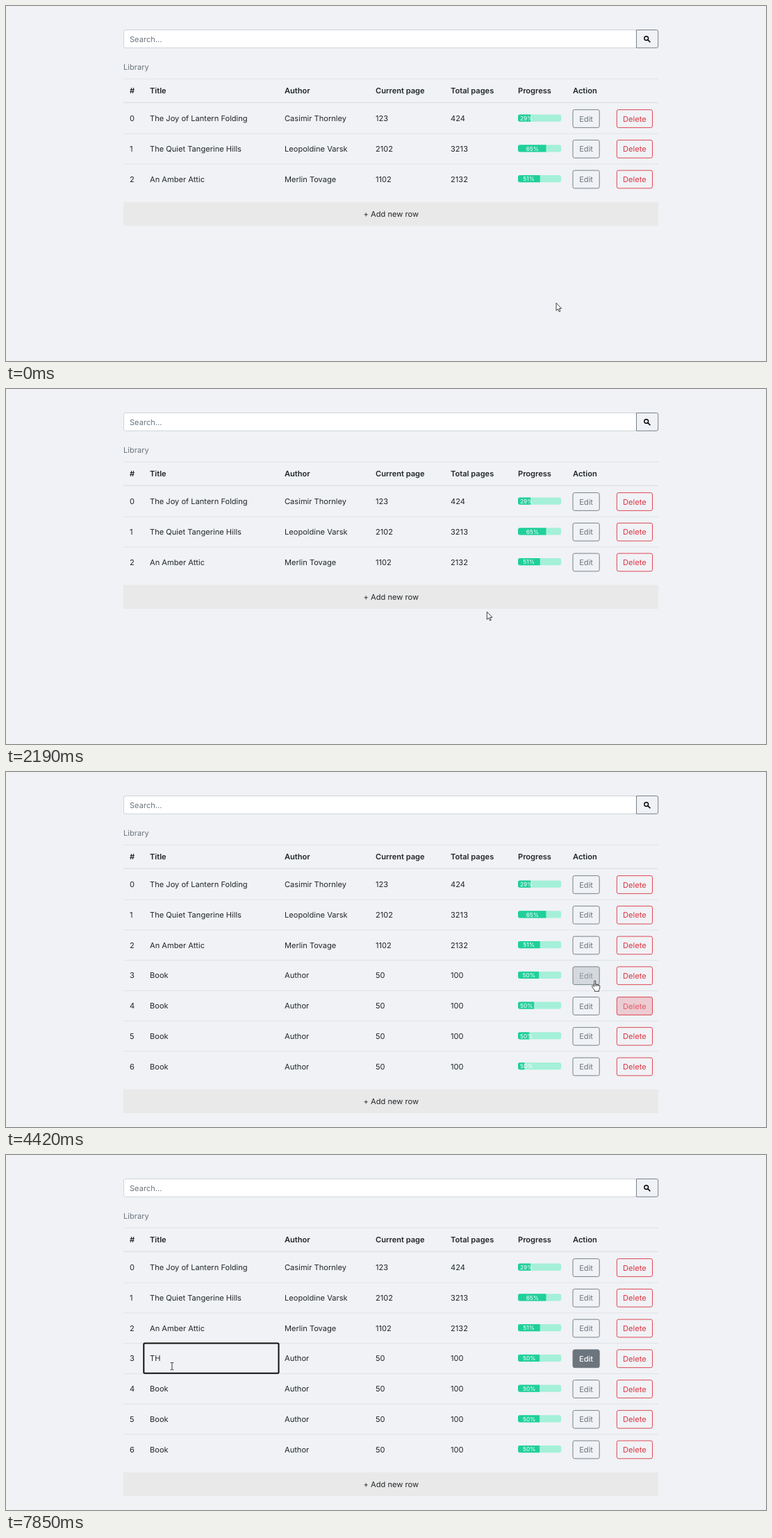
An HTML page that plays this animation: 1094x512 px, repeating every 8 s.

```html
<!DOCTYPE html>
<html lang="en">
<head>
<meta charset="utf-8">
<title>Library table</title>
<style>
  html, body { margin: 0; width: 100%; height: 100%; overflow: hidden; background: #f0f2f5; }
  svg { display: block; width: 100vw; height: 100vh; }
  text { font: 400 11.1px Inter, sans-serif; fill: #212529; text-rendering: geometricPrecision; white-space: pre; }
</style>
</head>
<body>
<svg id="stage" viewBox="0 0 1094 512"></svg>
<script>
const LOOP = 8000, PITCH = 43.75, GREY = '#6c757d', RED = '#dc3545';
const EDIT_AT = 4640, FOCUS_AT = 5780, FADE = 150, GROW = 1800;
const clamp = (v, a = 0, b = 1) => Math.min(b, Math.max(a, v));
const stage = document.getElementById('stage');

function set(node, attrs) {
  for (const k in attrs) node.setAttribute(k, attrs[k]);
  return node;
}
function add(parent, tag, attrs = {}, label) {
  const node = set(document.createElementNS('http://www.w3.org/2000/svg', tag), attrs);
  if (label !== undefined) node.textContent = label;
  parent.appendChild(node);
  return node;
}
const show = (node, on) => node.setAttribute('visibility', on ? 'visible' : 'hidden');
const text = (parent, x, y, label, style = '') => add(parent, 'text', { x, y, style }, label);
const line = (parent, y, h = 0.9) => add(parent, 'rect', { x: 169, y, width: 770, height: h, fill: '#dee2e6' });

// Search bar and header
add(stage, 'rect', { x: 169.5, y: 34.5, width: 738, height: 25.8, rx: 2.5, fill: '#fff', stroke: '#ced4da' });
text(stage, 178, 51.5, 'Search...', `fill:${GREY}`);
add(stage, 'path', {
  d: 'M907.5 34.5h28.8a2.4 2.4 0 0 1 2.4 2.4v21a2.4 2.4 0 0 1-2.4 2.4h-28.8z',
  fill: '#f0f2f5', stroke: GREY, 'stroke-width': 0.9
});
add(stage, 'circle', { cx: 921.7, cy: 46.6, r: 2.9, fill: 'none', stroke: '#000', 'stroke-width': 1.4 });
add(stage, 'path', { d: 'M923.7 48.6L927.4 52.3', stroke: '#000', 'stroke-width': 1.6 });
text(stage, 169, 92.3, 'Library', `fill:${GREY}`);
line(stage, 104.6);
line(stage, 138.6, 1.5);

const COLS = [178, 207, 401, 532, 640];
['#', 'Title', 'Author', 'Current page', 'Total pages', 'Progress', 'Action'].forEach((name, i) =>
  text(stage, [...COLS, 737, 816][i], 126.3, name, 'font-weight:600'));

// Table rows
function button(parent, x, width, label, color) {
  const ring = add(parent, 'rect', { x: x - 1.2, y: 148.6, width: width + 2.4, height: 27.9, rx: 3.8, fill: 'none', stroke: color, 'stroke-width': 2.4, opacity: 0 });
  const box = add(parent, 'rect', { x: x + 0.5, y: 149.6, width: width - 1, height: 25.8, rx: 2.5, fill: color, 'fill-opacity': 0, stroke: color, 'stroke-width': 0.9 });
  const tag = text(parent, x + width / 2, 166.5, label, `fill:${color};text-anchor:middle`);
  const rgb = [1, 3, 5].map(i => parseInt(color.slice(i, i + 2), 16));
  return {
    x, width, ring,
    fill(k) {
      box.setAttribute('fill-opacity', k);
      tag.style.fill = `rgb(${rgb.map(c => Math.round(c + (255 - c) * k))})`;
      tag.style.fontWeight = k > 0.99 ? 500 : 400;
    }
  };
}

function makeRow(cells, i, start) {
  const g = add(stage, 'g', { transform: `translate(0 ${i * PITCH})` });
  if (i) line(g, 139.9);
  const labels = [i, ...cells].map((c, n) => text(g, COLS[n], 166, c));
  const pct = start ? 50 : Math.round(cells[2] / cells[3] * 100);
  const id = 'clip' + i;
  add(add(g, 'clipPath', { id }), 'rect', { x: 737, y: 156.6, width: 62.2, height: 10.2, rx: 2.8 });
  const bar = add(g, 'g', { 'clip-path': `url(#${id})` });
  add(bar, 'rect', { x: 737, y: 156, width: 63, height: 12, fill: '#a5f0d8' });
  const fill = add(bar, 'rect', { x: 737, y: 156, height: 12, fill: '#20cf9a' });
  const tag = text(bar, 740, 164.8, pct + '%', 'fill:#fff;font-size:8.3px');
  return {
    i, g, start, pct, fill, tag, title: labels[1],
    edit: button(g, 815.5, 39.2, 'Edit', GREY),
    del: button(g, 878.8, 52.2, 'Delete', RED)
  };
}

const PRESSES = [[2600, 2675], [3010, 3085], [3430, 3480], [3800, 3880]];
const rows = [
  ['The Joy of Lantern Folding', 'Casimir Thornley', 123, 424],
  ['The Quiet Tangerine Hills', 'Leopoldine Varsk', 2102, 3213],
  ['An Amber Attic', 'Merlin Tovage', 1102, 2132]
].map((cells, i) => makeRow(cells, i, 0));
rows[1].pct = 65;
rows[1].tag.textContent = '65%';
rows[2].pct = 51;
rows[2].tag.textContent = '51%';
PRESSES.forEach(([, up], n) => rows.push(makeRow(['Book', 'Author', 50, 100], n + 3, up)));

// Bar for adding rows
const adder = add(stage, 'g');
const adderBox = add(adder, 'rect', { x: 169, y: 282.6, width: 770, height: 34.4 });
text(adder, 554.3, 304, '+ Add new row', 'text-anchor:middle');

// Cell being edited
const cell = add(stage, 'rect', { x: 198.3, y: 271.4, width: 194.2, height: 43.4, rx: 1.5, fill: 'none', stroke: '#101010', 'stroke-width': 2 });
const caret = add(stage, 'rect', { width: 0.9, height: 14, fill: '#212529' });
const TYPING = [
  [0, 'Book', 0], [FOCUS_AT, 'Book', 1], [6290, 'Book', 0], [6420, '', 1], [6730, '', 0],
  [6910, 'T', 1], [7010, 'TH', 1], [7190, 'THE', 1], [7640, 'THE', 0], [7740, 'TH', 1], [7850, 'TH', 0]
];

// Pointer shapes, each with its hot spot at 0,0
const glow = add(stage, 'circle', { r: 9, fill: '#efe83c', opacity: 0.78 });
const pointer = add(stage, 'g');
const ink = { fill: '#fff', stroke: '#111', 'stroke-width': 0.8, 'stroke-linejoin': 'round' };
const shapes = {
  arrow: add(pointer, 'path', { d: 'M0 .3V11.3L2.5 9 4.2 12.9 5.9 12.2 4.2 8.3H7.6Z', ...ink }),
  hand: add(pointer, 'path', {
    d: 'M-1 1.2Q-1-.2 0-.2T1 1.2V5.3Q2.6 4.5 3 5.8 4.6 5 5 6.4 7 5.8 7 7.6V10.5Q7 12.3 5.8 13.4V15.4H-.2V13.8Q-2 12-3.9 9-4.7 7.4-3.4 7.1-2.3 7-1 8.6ZM1 5.3V8M3 5.8V8M5 6.4V8',
    ...ink
  }),
  beam: add(pointer, 'path', { d: 'M-2.3-5H-.7L0-4.4.7-5H2.3M0-4.4V4.6M-2.3 5.3H-.7L0 4.6.7 5.3H2.3', fill: 'none', stroke: '#222', 'stroke-width': 0.9 })
};

const PATH = [
  [0, 792, 428], [220, 792, 428], [480, 800, 335], [700, 848, 255], [860, 888, 190], [1020, 907, 162],
  [1060, 908, 164], [1130, 909, 194], [1190, 909, 220], [1240, 909, 237], [1340, 908, 250.5],
  [1500, 897, 262], [1650, 800, 290], [1830, 711, 304], [1870, 711, 305], [1960, 693, 324], [2140, 693, 324],
  [2340, 689, 306], [2680, 689, 306], [2980, 681, 340], [3085, 681, 340], [3370, 652, 386], [3480, 651, 387],
  [3740, 615, 431], [3880, 615, 431], [4090, 994, 395], [4230, 905, 332], [4280, 900, 328], [4480, 838, 296],
  [4890, 838, 296], [5040, 587, 319], [5090, 363, 338], [5240, 200, 330], [5500, 230, 306], [5860, 239, 304.5], [LOOP, 239, 304.5]
];

// Monotone cubic interpolation through the path points
function slope(n, axis) {
  const [a, b, c] = [PATH[n - 1], PATH[n], PATH[n + 1]];
  if (!a || !c || (b[axis] - a[axis]) * (c[axis] - b[axis]) <= 0) return 0;
  return (c[axis] - a[axis]) / (c[0] - a[0]);
}
function pointerAt(t) {
  let n = 0;
  while (n < PATH.length - 2 && PATH[n + 1][0] <= t) n++;
  const a = PATH[n], b = PATH[n + 1], span = b[0] - a[0], u = (t - a[0]) / span;
  return [1, 2].map(k => {
    const s = u * u * (3 - 2 * u);
    return a[k] + (b[k] - a[k]) * s
      + span * u * (1 - u) * (slope(n, k) * (1 - u) - slope(n + 1, k) * u);
  });
}

const over = (b, i, [x, y]) =>
  x >= b.x && x <= b.x + b.width && Math.abs(y - 162.5 - i * PITCH) <= 13.2;

function draw(t) {
  const pos = pointerAt(t);
  const recent = Array.from({ length: 15 }, (_, k) => pointerAt(Math.max(0, t - k * FADE / 15)));
  const hover = (b, i) => recent.filter(p => over(b, i, p)).length / recent.length;
  let count = 0, onButton = false;

  for (const r of rows) {
    const live = t >= r.start;
    show(r.g, live);
    if (!live) continue;
    count++;
    const w = 62.2 * r.pct / 100 * (r.start ? clamp((t - r.start) / GROW) : 1);
    r.fill.setAttribute('width', w);
    r.tag.setAttribute('x', 737 + Math.max(3, (w - 17) / 2));
    const editing = r.i === 3 ? clamp((t - EDIT_AT) / FADE) : 0;
    r.edit.fill(Math.max(editing, hover(r.edit, r.i)));
    r.edit.ring.setAttribute('opacity', 0.5 * editing * (1 - clamp((t - FOCUS_AT) / FADE)));
    r.del.fill(hover(r.del, r.i));
    onButton = onButton || over(r.edit, r.i, pos) || over(r.del, r.i, pos);
  }

  const pressed = PRESSES.some(([down, up]) => t >= down && t < up);
  adder.setAttribute('transform', `translate(0 ${(count - 3) * PITCH})`);
  adderBox.setAttribute('fill', pressed ? '#dddddd' : '#e9e9e9');

  const [, typed, blink] = TYPING.filter(s => s[0] <= t).pop();
  const title = rows[3].title;
  title.textContent = typed;
  show(cell, t >= FOCUS_AT);
  show(caret, blink);
  set(caret, { x: 207 + (typed ? title.getComputedTextLength() : 0), y: typed ? 286.5 : 282 });

  const inCell = t >= EDIT_AT && pos[0] > 198 && pos[0] < 728 && pos[1] > 271.5 && pos[1] < 315;
  const kind = onButton ? 'hand' : inCell ? 'beam' : 'arrow';
  for (const k in shapes) show(shapes[k], k === kind);
  pointer.setAttribute('transform', `translate(${pos})`);
  show(glow, pressed);
  set(glow, { cx: pos[0], cy: pos[1] });
}

const begin = performance.now();
function tick() {
  draw((performance.now() - begin) % LOOP);
  requestAnimationFrame(tick);
}
tick();
</script>
</body>
</html>
```
